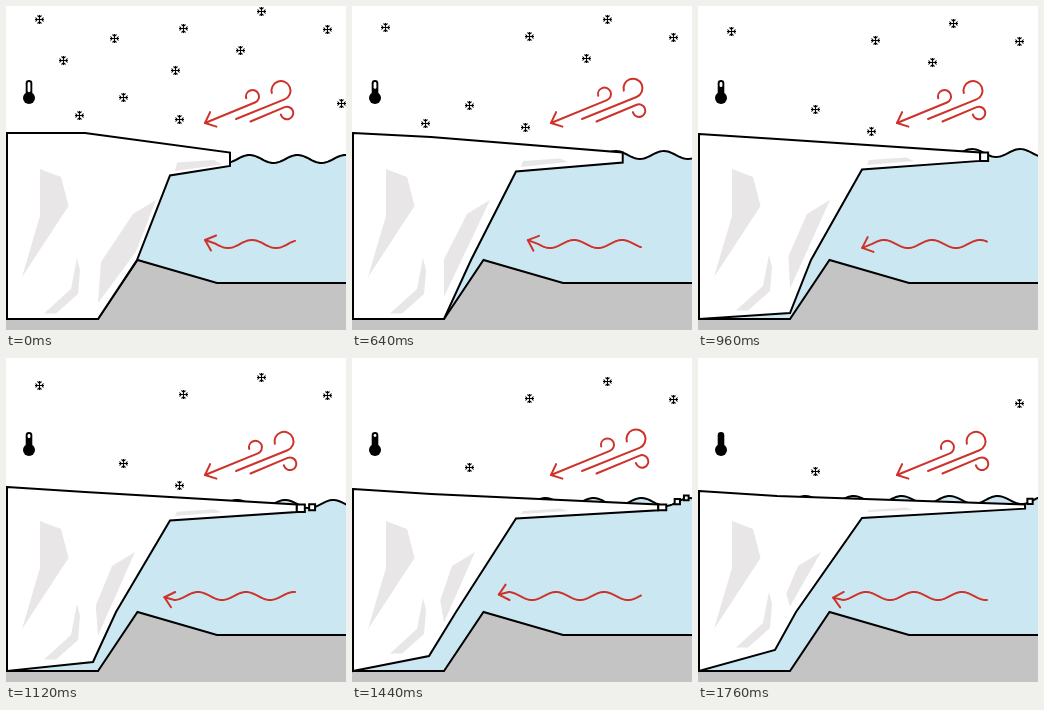
Animation, 340 px wide and 324 px high, one loop 1.92 s. Source, as an HTML page with a canvas:

```html
<!DOCTYPE html>
<html lang="en">
<head>
<meta charset="utf-8">
<title>Glacier retreat</title>
<style>
html, body { margin: 0; width: 100%; height: 100%; overflow: hidden; background: #fff; }
canvas { display: block; }
</style>
</head>
<body>
<canvas id="stage" width="340" height="324"></canvas>
<script>
const ctx = document.getElementById('stage').getContext('2d');
const STEP = 160, STEPS = 12, TAU = Math.PI * 2, WAVELENGTH = 48;
const INK = '#000', SEA = '#cbe8f2', ROCK = '#c4c4c4', SHADE = '#e8e6e7', RED = '#cd332b';

function shape(points, fill, stroke) {
  ctx.beginPath();
  for (const [x, y] of points) ctx.lineTo(x, y);
  ctx.closePath();
  if (fill) { ctx.fillStyle = fill; ctx.fill(); }
  if (stroke) { ctx.strokeStyle = stroke; ctx.stroke(); }
}

const wave = (x, crest, mid) => mid - 4 * Math.cos((x - crest) / WAVELENGTH * TAU);
const seaLevel = (x, k) => wave(x, 243.5 + 5.1 * k, 153 - k);

function drawSea(k) {
  const surface = [];
  for (let x = -4; x <= 344; x += 2) surface.push([x, seaLevel(x, k)]);
  shape([...surface, [344, 330], [-4, 330]], SEA, INK);
}

function drawRock() {
  shape([[-4, 313], [92, 313], [131.5, 254], [211, 277], [344, 277], [344, 330], [-4, 330]], ROCK, INK);
}

// The ice tongue advances ever more slowly and loses a piece at some steps.
const TONGUE_TOP = 146.5, PIECE = 8, calvings = [6, 7, 9];
const front = k => 224 + 13 * k - 0.33 * k * k;
const tongueBottom = k => 160 - 0.85 * k;

function drawGlacier(k) {
  const tip = front(k) - (calvings.includes(k) ? PIECE : 0);
  shape([
    [1, 127 + Math.max(0, k - 5)],
    [79, 127 + k],
    [tip, TONGUE_TOP],
    [tip, tongueBottom(k)],
    [164, Math.max(160, 169.5 - k)],
    [131 - 3 * k, 254],
    [Math.min(92, Math.max(77, 122 - 5 * k)), 313 - 3 * Math.max(0, k - 4)],
    [1, 313]
  ], '#fff', INK);
}

function drawShading(k) {
  shape([[34, 163], [55, 171], [62.5, 200], [16, 271], [34, 210]], SHADE);

  const lift = 3 * Math.max(0, k - 5);
  shape([[71, 252], [74, 264], [72, 288], [50, 307.5], [38, 307.5], [65, 283]]
    .map(([x, y]) => [x, y - lift]), SHADE);

  const shift = 3 * Math.min(k, 9), top = 150 - shift, low = 297 - 0.4 * k * k;
  shape([
    [top, 194],
    [top - 23, 208],
    [95 - shift / 4, 256 - k * k / 6],
    [92, low],
    [(top + 92) / 2 + Math.max(0, 9 - 2.2 * k), (low + 194) / 2]
  ], SHADE);

  shape([
    [171, 156.5 - 0.4 * k], [208, 154 - 0.4 * k],
    [216, 158.5 - 0.6 * k], [169, 165 - k]
  ], SHADE);
}

function drawBergs(k) {
  for (const born of calvings) {
    const age = k - born;
    if (age < 0) continue;
    const x = front(born) - PIECE / 2 + (35 - 2.5 * born) * age ** 0.8;
    const thickness = tongueBottom(born) - TONGUE_TOP;
    const size = 6.5 - 0.6 * age;
    const w = (age ? size : PIECE) / 2, h = (age ? size : thickness) / 2;
    const y = age ? seaLevel(x, k) - 0.5 : TONGUE_TOP + h;
    shape([[x - w, y - h], [x + w, y - h], [x + w, y + h], [x - w, y + h]], '#fff', INK);
  }
}

function arrowHead(x, y, angle) {
  const end = a => [x + 12 * Math.cos(a), y + 12 * Math.sin(a)];
  ctx.beginPath();
  ctx.moveTo(...end(angle - 0.72));
  ctx.lineTo(x, y);
  ctx.lineTo(...end(angle + 0.72));
  ctx.stroke();
}

function drawCurrent(k) {
  const tip = 199 - 5.8 * k, neck = tip + 10;
  const level = x => wave(x, 246 + 6 * k, 238);
  ctx.beginPath();
  ctx.moveTo(tip, level(tip));
  for (let x = neck; x < 289; x++) ctx.lineTo(x, level(x));
  ctx.lineTo(289, level(289));
  ctx.stroke();
  arrowHead(tip, level(tip), Math.atan2(level(neck) - level(tip), 10));
}

// A gust is a straight line that runs tangentially into a curl.
function gust(x, y, cx, cy, r, up) {
  const start = up ? 1.19 : 1.19 - Math.PI;
  ctx.beginPath();
  ctx.moveTo(x, y);
  ctx.arc(cx, cy, r, start, up ? -3.4 : 2.9, up);
  ctx.stroke();
}

function drawWind(k) {
  const phase = k % 6, dx = 3 * Math.min(phase, 6 - phase), dy = -0.4 * dx;
  gust(199, 117, 246.5 + dx, 90.5 + dy, 6.5, true);
  gust(230, 113, 275 + dx, 84.6 + dy, 9.5, true);
  gust(244.5, 115.5, 281 + dx, 107 + dy, 6.3, false);
  arrowHead(199, 117, -0.41);
}

// Starting places, in the order in which the flakes vanish.
const flakes = [
  [335, 97], [108, 32], [169, 64], [57, 54], [73, 109], [234, 44],
  [33, 13], [173, 113], [255, 5], [177, 22], [321, 23], [117, 91]
];
function drawFlake(x, y) {
  ctx.save();
  ctx.translate(x + 0.5, y + 0.5);
  ctx.lineWidth = 1.1;
  ctx.beginPath();
  for (let i = 0; i < 4; i++) {
    ctx.moveTo(0, 0);
    ctx.lineTo(0, -4.5);
    ctx.moveTo(-2, -4);
    ctx.lineTo(0, -2.2);
    ctx.lineTo(2, -4);
    ctx.rotate(Math.PI / 2);
  }
  ctx.stroke();
  ctx.restore();
}

function drawSnow(k) {
  flakes.forEach(([x, y], i) => {
    if (k < Math.round(1 + 1.11 * i)) drawFlake(x, y + 2 * k);
  });
}

function line(x, y1, y2, width, colour) {
  ctx.strokeStyle = colour;
  ctx.lineWidth = width;
  ctx.beginPath();
  ctx.moveTo(x, y1);
  ctx.lineTo(x, y2);
  ctx.stroke();
}

function drawThermometer(k) {
  ctx.lineCap = 'round';
  line(23, 77.2, 92, 6.6, INK);
  ctx.fillStyle = INK;
  ctx.beginPath();
  ctx.arc(23, 92, 6, 0, TAU);
  ctx.fill();
  if (k < STEPS - 1) line(23, 77.5, Math.max(77.6, 84.8 - 0.85 * k), 2.8, '#fff');
}

function draw(k) {
  ctx.fillStyle = '#fff';
  ctx.fillRect(0, 0, 340, 324);
  ctx.lineCap = 'butt';
  ctx.lineJoin = 'miter';
  ctx.lineWidth = 2;
  drawSea(k);
  drawRock();
  drawGlacier(k);
  drawShading(k);
  drawBergs(k);

  ctx.strokeStyle = RED;
  ctx.lineCap = ctx.lineJoin = 'round';
  drawCurrent(k);
  drawWind(k);

  ctx.strokeStyle = INK;
  ctx.lineCap = 'butt';
  ctx.lineJoin = 'miter';
  drawSnow(k);
  drawThermometer(k);
}

const begin = performance.now();
function tick() {
  draw(Math.floor((performance.now() - begin) / STEP) % STEPS);
  requestAnimationFrame(tick);
}
tick();
</script>
</body>
</html>
```
